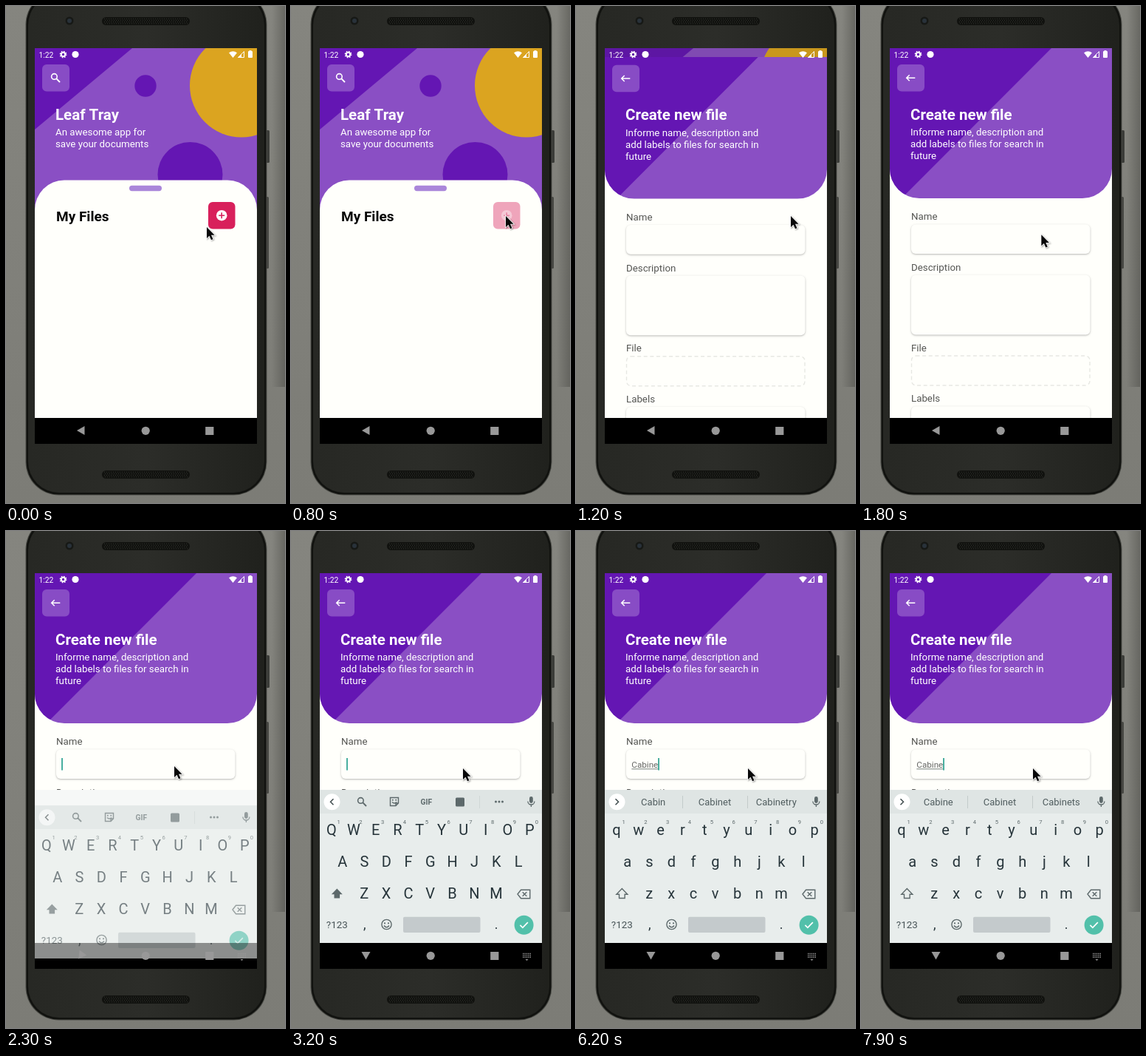
These frames come from a looping animation (378x672 px, 8 s). An HTML page with a canvas:

```html
<!DOCTYPE html>
<html lang="en">
<head>
<meta charset="utf-8">
<title>Create new file</title>
<style>
html, body { margin: 0; width: 100%; height: 100%; overflow: hidden; background: #81817b; }
canvas { display: block; width: 378px; height: 672px; }
</style>
</head>
<body>
<canvas id="stage" width="378" height="672"></canvas>
<script>
const ctx = document.getElementById('stage').getContext('2d');
const LOOP = 8000, STEP = 100;
const DEEP = '#6416b3', LIGHT = '#8a4fc4', PAPER = '#fffffb', ICON = '#5d696b', KEY = '#26343a';
const WORD = 'Cabinet';

// Timelines: the last entry whose time has passed applies.
const TYPED = [[0, 0], [4600, 1], [4700, 2], [4800, 3], [5800, 4], [6000, 5], [6200, 6], [6400, 7], [7800, 6]];
const SUGGESTIONS = [
  [0, null],
  [4700, ['Ca', 'Can', 'Car']],
  [4800, ['Cab', 'Cabinet', 'Cable']],
  [5900, ['Cabi', 'Cabinet', 'Cabin']],
  [6000, ['Cabin', 'Cabinet', 'Cabinetry']],
  [6300, ['Cabine', 'Cabinet', 'Cabinets']],
  [6400, ['Cabinet', 'Cabinet', 'Cabinets']],
  [7900, ['Cabine', 'Cabinet', 'Cabinets']]
];
const CARET = [[0, false], [2200, true], [2600, false], [3200, true], [3600, false], [4100, true],
  [5300, false], [5800, true], [6900, false], [7400, true]];
const BUTTON_ALPHA = [[0, 1], [700, .7], [800, .4], [900, .65]];
// Height of the part still showing the home screen, and both screens' offsets.
const TRANSITION = [[0, [557, 0, 0]], [1000, [197, -7, 5.5]], [1100, [130, -9, 2.2]], [1200, [69, -10, .7]], [1300, [57, 0, 0]]];
const KEYBOARD = [[0, null], [2200, [23, .2]], [2300, [21, .6]], [2400, [0, 1]]];
const POINTER = [[0, 272, 299], [700, 291, 284], [1400, 291, 284], [2000, 228, 318], [2700, 228, 318], [3000, 233, 321]];

const at = (track, t) => track.findLast(([time]) => time <= t)[1];

function pointerAt(t) {
  const i = POINTER.findLastIndex(([time]) => time <= t);
  const [t0, x0, y0] = POINTER[i], [t1, x1, y1] = POINTER[i + 1] || [LOOP, x0, y0];
  const p = (t - t0) / (t1 - t0), e = p * p * (3 - 2 * p);
  return [x0 + (x1 - x0) * e, y0 + (y1 - y0) * e];
}

function layer(draw, { dx = 0, dy = 0, alpha = 1, clip } = {}) {
  ctx.save();
  if (clip) { ctx.beginPath(); ctx.rect(...clip); ctx.clip(); }
  ctx.translate(dx, dy);
  ctx.globalAlpha *= alpha;
  draw();
  ctx.restore();
}
function rect(x, y, w, h, color) { ctx.fillStyle = color; ctx.fillRect(x, y, w, h); }
function round(x, y, w, h, r, color) {
  ctx.beginPath(); ctx.roundRect(x, y, w, h, r); ctx.fillStyle = color; ctx.fill();
}
function disc(x, y, r, color) {
  ctx.beginPath(); ctx.arc(x, y, r, 0, 7); ctx.fillStyle = color; ctx.fill();
}
function fill(path, x, y, color) {
  layer(() => { ctx.fillStyle = color; ctx.fill(new Path2D(path)); }, { dx: x, dy: y });
}
function stroke(path, x, y, color, width = 1.4, dash = []) {
  layer(() => {
    ctx.strokeStyle = color; ctx.lineWidth = width; ctx.setLineDash(dash);
    ctx.stroke(new Path2D(path));
  }, { dx: x, dy: y });
}
const ring = r => `M${r} 0A${r} ${r} 0 1 1 ${-r} 0A${r} ${r} 0 1 1 ${r} 0`;
function text(str, x, y, size, color, { bold = false, align = 'left' } = {}) {
  ctx.font = `${bold ? 'bold ' : ''}${size}px Roboto, sans-serif`;
  ctx.textAlign = align; ctx.fillStyle = color;
  ctx.fillText(str, x, y);
}
const centered = (str, x, y, size, color, bold) => text(str, x, y, size, color, { bold, align: 'center' });
function searchIcon(x, y, color) {
  stroke(ring(3.8), x - 1.6, y - 1.6, color, 1.6);
  stroke('M1.2 1.2L6 6', x, y, color, 1.9);
}

function gradient(x0, y0, x1, y1, ...colors) {
  const g = ctx.createLinearGradient(x0, y0, x1, y1);
  colors.forEach((c, i) => g.addColorStop(i / (colors.length - 1), c));
  return g;
}
function speaker(y) {
  round(130, y, 119, 11, 5.5, '#11120f');
  for (let i = 0; i < 4; i++) stroke('M0 0H112', 133 + i % 2, y + 2.2 + i * 2.2, '#31322e', 1, [1, 2]);
}
function phone() {
  rect(0, 0, 378, 672, gradient(0, 0, 0, 672, '#85857f', '#7c7c76'));
  rect(360, 0, 18, 515, gradient(360, 0, 378, 0, 'rgba(60,60,56,0)', 'rgba(60,60,56,.4)'));
  round(351, 168, 6, 44, 1.5, '#3b3c38');
  round(351, 258, 5, 97, 1.5, '#464742');
  round(26.5, -20, 327, 681.5, 45, '#4a4b46');
  round(27.5, -19, 325, 679.5, 44, '#11120f');
  round(30, -16, 320, 674, 42, gradient(30, 0, 350, 0, '#272824', '#2c2d29', '#20211d'));
  speaker(15); speaker(628);
  disc(86, 20, 5.5, '#171916'); disc(86, 20, 3, '#29323a');
}

function statusBar() {
  text('1:22', 44.5, 69.5, 10.3, '#fff');
  stroke(ring(2.7), 77.5, 65.5, '#fff', 2);
  stroke(ring(4.2), 77.5, 65.5, '#fff', 1.4, [1.65, 1.65]);
  disc(94, 65.5, 4.6, '#fff');
  fill('M0 4.5L-5.5-2.2Q0-6.5 5.5-2.2Z', 307.5, 65.5, '#fff');
  stroke('M.5 8.5L8.5 .5V8.5Z', 314, 61, '#fff', 1);
  fill('M0 9L5 4V9Z', 314, 61, '#fff');
  round(328, 61, 6, 9, 1, '#fff'); rect(329.5, 60, 3, 1, '#fff');
}
function headerText(title, lines) {
  text(title, 67, 153.7, 20.5, '#fff', { bold: true });
  lines.forEach((line, i) => text(line, 67, 175.4 + i * 15.8, 13.3, '#fff'));
}
function cornerBand(right, bottom) {
  ctx.beginPath(); ctx.moveTo(39, 57); ctx.lineTo(right, 57); ctx.lineTo(39, bottom);
  ctx.fillStyle = DEEP; ctx.fill();
}
const iconButton = () => round(49, 79, 37, 36.5, 6, 'rgba(255,255,255,.23)');

function homeScreen(buttonAlpha) {
  rect(39, 57, 301, 510, LIGHT);
  cornerBand(171, 167);
  disc(189, 108, 14.7, DEEP);
  disc(249.5, 228, 44, DEEP);
  disc(319, 107.5, 70, '#dba420');
  iconButton();
  searchIcon(67, 97, '#fff');
  headerText('Leaf Tray', ['An awesome app for', 'save your documents']);
  round(39, 235.5, 301, 340, [40, 40, 0, 0], PAPER);
  round(167, 242.7, 44, 7.5, 3.7, '#aa86da');
  text('My Files', 68, 291, 19, '#050505', { bold: true });
  layer(() => {
    round(274, 265, 36.5, 36.5, 6, '#d8205b');
    disc(292.2, 283.2, 7.3, '#fff');
    stroke('M-4 0H4M0-4V4', 292.2, 283.2, '#d8205b', 1.6);
  }, { alpha: buttonAlpha });
}

function field(label, y, height) {
  text(label, 68, y - 6, 13.3, '#555653');
  layer(() => {
    ctx.shadowColor = 'rgba(0,0,0,.28)'; ctx.shadowBlur = 2.5; ctx.shadowOffsetY = 1;
    round(68, y, 242.5, height, 6, PAPER);
  });
}
function formScreen() {
  rect(39, 50, 301, 510, PAPER);
  layer(() => {
    ctx.beginPath(); ctx.roundRect(39, 40, 301, 220, [0, 0, 40, 40]); ctx.clip();
    rect(39, 40, 301, 220, LIGHT);
    cornerBand(258, 276);
  });
  iconButton();
  stroke('M6.3 0H-5M-1.3-4L-5.3 0L-1.3 4', 67, 97.3, '#fff', 1.5);
  headerText('Create new file', ['Informe name, description and', 'add labels to files for search in', 'future']);
  field('Name', 295.3, 39.7);
  field('Description', 363.8, 80.7);
  text('File', 68, 466.7, 13.3, '#555653');
  ctx.beginPath(); ctx.roundRect(68.5, 473, 241.5, 40, 6);
  layer(() => {
    ctx.strokeStyle = '#e7e8e3'; ctx.lineWidth = 1.4; ctx.setLineDash([5, 3.6]); ctx.stroke();
  });
  field('Labels', 541.3, 40);
}

function nameInput(t) {
  const value = WORD.slice(0, at(TYPED, t));
  text(value, 75.3, 320, 11.7, '#686967');
  const width = ctx.measureText(value).width;
  rect(75.3, 321.3, width, 1, '#77807d');
  if (at(CARET, t)) rect(75.2 + width, 307, 1.6, 16.5, '#1d9c88');
}

function keyboardToolbar(suggestions) {
  rect(39, 350, 301, 32, '#dfe5e4');
  disc(55.5, 366.3, 11, '#fff');
  const side = suggestions ? 1 : -1;
  stroke(`M${-2 * side}-4L${2 * side} 0L${-2 * side} 4`, 55.5, 366.3, '#3f4b4d', 1.5);
  if (suggestions) {
    suggestions.forEach((word, i) => centered(word, 104.7 + i * 83.3, 371, 13, '#505d5f'));
    rect(144, 358, 1, 17, '#c3cbca'); rect(232, 358, 1, 17, '#c3cbca');
  } else {
    searchIcon(96, 366, ICON);
    stroke('M-5.5-5.5H5.5V2L2 5.5H-5.5ZM5.5 2H2V5.5M-3 .5Q0 3.5 3 .5', 140, 366, ICON);
    disc(137.8, 363.8, 1, ICON); disc(142.2, 363.8, 1, ICON);
    centered('GIF', 183.3, 369.8, 10.2, ICON, true);
    round(223, 360.5, 12, 12, 1.5, ICON);
    rect(255, 358, 1, 17, '#d0d7d6');
    for (const x of [277.5, 282, 286.5]) disc(x, 366, 1.5, ICON);
  }
  round(323, 359, 4.8, 9, 2.4, ICON);
  stroke('M-4.5-1A4.5 4.5 0 0 0 4.5-1M0 3.5V6.5', 325.4, 366.5, ICON, 1.3);
}
function keyboard(t) {
  rect(39, 350, 301, 207, '#e8edec');
  keyboardToolbar(at(SUGGESTIONS, t));
  const upper = at(TYPED, t) === 0;
  [['qwertyuiop', 55, 410.5], ['asdfghjkl', 69.7, 453.7], ['zxcvbnm', 99.3, 497]].forEach(([keys, x, y], row) =>
    [...keys].forEach((key, i) => {
      centered(upper ? key.toUpperCase() : key, x + i * 29.8, y, 20, KEY);
      if (row === 0) centered((i + 1) % 10, x + i * 29.8 + 9.6, 396, 7.6, ICON);
    }));
  const shift = 'M0-7L7.5 .8H3.8V6H-3.8V.8H-7.5Z';
  if (upper) fill(shift, 62.3, 490.5, ICON);
  else stroke(shift, 62.3, 490.5, ICON);
  stroke('M-8.5 0L-4-5.7H8.3V5.7H-4ZM-1.8-2.8L3.8 2.8M3.8-2.8L-1.8 2.8', 315.5, 491, ICON);
  centered('?123', 62.3, 537, 13.4, '#465356');
  centered(',', 99.7, 537.5, 18, KEY);
  stroke(ring(6.6), 129.5, 532, ICON);
  disc(127, 530.3, 1.1, ICON); disc(132, 530.3, 1.1, ICON);
  stroke('M-3.5 1.5Q0 6 3.5 1.5', 129.5, 532, ICON);
  round(152, 521.7, 104.5, 21.3, 2, '#c4cacc');
  centered('.', 278, 537.5, 18, KEY);
  disc(315.6, 532.7, 13, '#52c0aa');
  stroke('M-5.2 .2L-1.7 3.7L5.3-3.6', 315.6, 532.7, '#fff', 1.7);
}

function navigationBar(turn, showKeyboardIcon) {
  const color = '#989898';
  layer(() => {
    ctx.rotate(-turn * Math.PI / 2);
    fill('M-5.5 0L5-6V6Z', 0, 0, color);
  }, { dx: 101.5, dy: 574 });
  disc(189.2, 574.3, 5.6, color);
  rect(270.2, 569, 11.2, 11, color);
  if (!showKeyboardIcon) return;
  layer(() => {
    for (let i = 0; i < 3; i++) stroke('M0 0H11', 314, 571.5 + i * 2.4, color, 1.4, [1.4, 1]);
    fill('M-2 0H2L0 2Z', 319.5, 579, color);
  });
}

function pointer(x, y) {
  const arrow = 'M0 0V15L3.5 11.7L6 17.3L8.5 16.2L6 10.8H10.6Z';
  layer(() => {
    ctx.shadowColor = 'rgba(0,0,0,.35)'; ctx.shadowBlur = 2; ctx.shadowOffsetX = 1; ctx.shadowOffsetY = 1;
    stroke(arrow, x, y, '#fff', 1.6);
  });
  fill(arrow, x, y, '#080808');
}

function draw(t) {
  phone();
  rect(39, 57, 301, 535, '#000');
  const [split, homeShift, formShift] = at(TRANSITION, t);
  layer(() => {
    layer(formScreen, { dy: formShift });
    if (t >= 2200) nameInput(t);
  }, { clip: [39, 57, 301, 500] });
  layer(() => {
    layer(() => homeScreen(at(BUTTON_ALPHA, t)), { dy: homeShift });
    if (t >= 1000) rect(39, 57, 301, 500, 'rgba(30,30,0,.09)');
  }, { clip: [39, 57, 301, split - 57] });
  statusBar();

  const panel = at(KEYBOARD, t);
  if (panel) {
    const [offset, alpha] = panel;
    rect(39, 350, 301, 207, '#f6f8f7');
    if (offset) rect(39, 557, 301, offset, '#f6f8f7');
    layer(() => keyboard(t), { dy: offset, alpha });
    if (offset) rect(39, 557, 301, offset, 'rgba(0,0,0,.41)');
  }
  navigationBar(panel ? panel[1] : 0, !!panel);
  pointer(...pointerAt(t));
}

function frame(now) {
  draw(Math.floor(now % LOOP / STEP) * STEP);
  requestAnimationFrame(frame);
}
requestAnimationFrame(frame);
</script>
</body>
</html>
```
